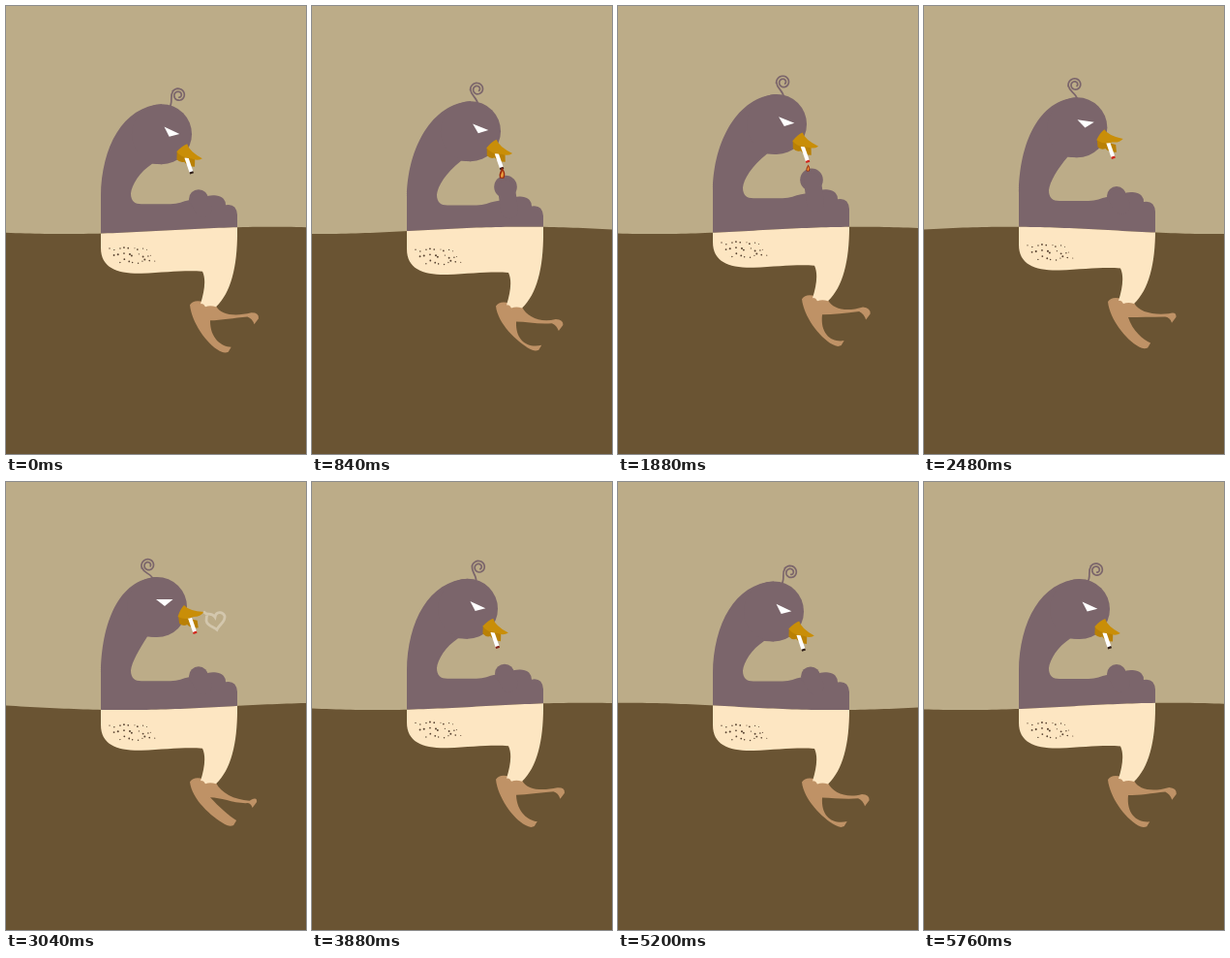
These frames come from a looping animation (310x462 px, 5.8 s). An HTML page with a canvas:

```html
<!DOCTYPE html>
<html lang="en">
<head>
<meta charset="utf-8">
<title>Smoking duck</title>
<style>
  html, body { margin: 0; width: 100%; height: 100%; overflow: hidden; background: #bcac88; }
  canvas { display: block; width: 310px; height: 462px; }
</style>
</head>
<body>
<canvas id="stage"></canvas>
<script>
const W = 310, H = 462, LOOP = 5800, TAU = Math.PI * 2;
const SKY = '#bcac88', GROUND = '#6a5433', SKIN = '#7b656b', LEG = '#fde6c2', FOOT = '#bf9266';
const canvas = document.getElementById('stage');
const ctx = canvas.getContext('2d');
const dpr = window.devicePixelRatio || 1;
canvas.width = W * dpr;
canvas.height = H * dpr;

// Eased 0 to 1 between two times
function ramp(t, from, to) {
  const k = Math.min(1, Math.max(0, (t - from) / (to - from)));
  return (1 - Math.cos(Math.PI * k)) / 2;
}

// Rises from a to b, stays, and falls from c to d
const hold = (t, a, b, c, d) => ramp(t, a, b) - ramp(t, c, d);

const cycle = (t, count, peak) => Math.cos(TAU * (count * t / LOOP - peak));

function seeded(seed) {
  return () => (seed = seed * 16807 % 2147483647) / 2147483647;
}

function fill(d, color) {
  ctx.fillStyle = color;
  ctx.fill(new Path2D(d));
}

function disc(x, y, r, color) {
  ctx.fillStyle = color;
  ctx.beginPath();
  ctx.arc(x, y, r, 0, TAU);
  ctx.fill();
}

function at(x, y, degrees, draw) {
  ctx.save();
  ctx.translate(x, y);
  ctx.rotate(degrees * Math.PI / 180);
  draw();
  ctx.restore();
}

function poseAt(t) {
  const light = hold(t, 200, 620, 2100, 2650);
  const blow = hold(t, 2150, 2700, 3300, 3900);
  const sway = hold(t, 2150, 2700, 3300, 4400);
  const turn = 25 - 3 * light - 25 * blow;
  const a = turn * Math.PI / 180, c = Math.cos(a), s = Math.sin(a);
  const hx = 161 + 3 * light - 5 * blow, hy = 131 - 4.3 * (light + blow);
  return {
    hx, hy, turn, blow,
    curl: 36 - 39 * light - 57 * sway,
    lift: hold(t, 220, 620, 2050, 2500),
    // Head coordinates to stage coordinates
    onHead: (x, y) => [hx + x * c - y * s, hy + x * s + y * c]
  };
}

function waterPath(t) {
  const path = new Path2D();
  const peak = 60 + 430 * 6 * t / LOOP;
  path.moveTo(0, H);
  for (let x = 0; x <= W; x += 5) path.lineTo(x, 231.4 + 3.7 * Math.cos(TAU * (x - peak) / 430));
  path.lineTo(W, H);
  path.closePath();
  return path;
}

function drawCurl({ onHead, curl }) {
  at(...onHead(-4, -30), curl, () => {
    ctx.beginPath();
    ctx.moveTo(0, 3);
    ctx.bezierCurveTo(0, -6, -7, -7, -7, -14);
    for (let k = 0; k <= 1; k += .02) {
      const a = Math.PI + k * 1.65 * TAU, r = 7.2 - 5 * k;
      ctx.lineTo(r * Math.cos(a), -14 + r * Math.sin(a));
    }
    ctx.strokeStyle = SKIN;
    ctx.lineWidth = 1.7;
    ctx.lineCap = 'round';
    ctx.stroke();
  });
}

function drawBody({ hx, hy, lift }) {
  fill(`M98 262V195C98.5 144 ${hx - 40} ${hy - 29} ${hx} ${hy - 31}V${hy + 31}L${hx - 10} ${hy + 30.5}
    C138 170 130 183 129 192C129 200 133 203 140 203H170C178 203 183 200 189 199L206 196
    C209 193 222 193 225 198Q227 200 227 204Q238 202 239 214V262Z`, SKIN);
  disc(hx, hy, 31, SKIN);
  const x = 199 + lift, y = 198 - 14 * lift;
  disc(x, y, 10 + 1.8 * lift, SKIN);
  ctx.strokeStyle = SKIN;
  ctx.lineWidth = 18;
  ctx.lineCap = 'round';
  ctx.beginPath();
  ctx.moveTo(x + 1, y + 2);
  ctx.lineTo(204, 208);
  ctx.stroke();
}

function drawFlame(x, y, t) {
  const size = hold(t, 560, 720, 1900, 2050) * (1 - .35 * ramp(t, 1150, 1500));
  if (size < .02) return;
  at(x, y + 10, 0, () => {
    ctx.scale(size, size * (1 + .08 * Math.sin(t / 30)));
    fill('M-2 0C-4 -5 -1 -7 0 -11C3 -7 4 -4 2 0Z', '#9c2a0c');
    fill('M-1 -1C-2 -4 0 -5 .5 -8C2 -5 2 -3 1 -1Z', '#ea9a3c');
  });
}

function drawFace({ hx, hy, turn, blow, onHead }, t) {
  const glow = hold(t, 750, 1150, 3300, 4500);
  const [x, y] = onHead(34.5, 12.5);
  at(hx, hy, turn, () => {
    fill('M-1 -8L16.5 -8L8 -1Z', '#fff');
    at(24, 10, 15 * blow, () => fill('M-2 0L1 7Q6 9 9 6Q14 9 21 6L18 -1Z', '#b98005'));
  });
  at(x, y, -19, () => {
    ctx.fillStyle = '#fff';
    ctx.fillRect(-2, -2, 4, 16);
    ctx.fillStyle = `rgb(${45 + 165 * glow}, ${28 + 12 * glow}, ${22 + 8 * glow})`;
    ctx.fillRect(-2, 13.5, 4, 2.2);
  });
  at(hx, hy, turn, () => fill('M21.5 10Q24 2 28 -2Q33 4 48.5 5Q45 10 38 10Q30 14 21.5 10Z', '#c98e08'));
  drawFlame(x + 5, y + 14, t);
}

function drawHeart(t) {
  const drawn = ramp(t, 2600, 2960), fade = ramp(t, 3120, 3550);
  if (!drawn || fade === 1) return;
  ctx.save();
  ctx.globalAlpha = .6 * (1 - fade);
  ctx.translate(216 + 8 * fade, 140 - 4 * fade);
  ctx.strokeStyle = '#e2d8c6';
  ctx.lineWidth = 2.8;
  ctx.lineCap = 'round';
  ctx.setLineDash([80 * drawn, 100]);
  ctx.stroke(new Path2D('M-11 -8C-8 -4 -4 -9 0 -3C1 -9 8 -9 10 -4C11 2 4 5 2 10C-2 7 -8 6 -9 1Q-9 -3 -8 -6'));
  ctx.restore();
}

function drawFeet(t) {
  const c = cycle(t, 12, 0), g = cycle(t, 12, .86);
  const ux = 258 + 1.5 * c, uy = 325.3 - 5.3 * c;
  const lx = 237 - 4.3 * c, ly = 349.5 + 3 * c;
  fill(`M190 307Q194 301 204 304L217 308
    C222 318 ${ux - 22} ${uy - 1} ${ux - 6} ${uy - 3 - 3 * g}
    Q${ux + 2} ${uy - 5} ${ux + 1.5} ${uy + 1}L${ux - 3} ${uy + 7}
    Q${ux - 5} ${uy + 1} ${ux - 10} ${uy + .5 - 2 * g}
    C${ux - 24} ${uy + 1 - g} 222 323 211 323
    C${214.5 - 6 * g} ${338 + 6 * g} ${226 - 5 * g} ${347 + 5 * g} ${lx} ${ly - 2}
    L${lx - 3} ${ly + 3}Q${lx - 7} ${ly + 5} ${lx - 12} ${ly + 2}
    C${lx - 26} ${ly - 6} 192 325 190 307Z`, FOOT);
}

function drawLeg() {
  fill(`M98 215V248C98 269 115 275 140 274.5C165 273.5 185 271 203 272.5
    C207 281 205 293 201 306Q204 305 206 309Q211 307 217 309C233 294 239.5 266 239 228V215Z`, LEG);
  const random = seeded(11);
  for (let row = 0; row < 3; row++) {
    for (let i = 0; i < 9; i++) {
      const x = 107 + 4 * row + 4.7 * i + 3 * random();
      const y = 247 + 6.5 * row + 4 * random();
      disc(x, y, .5 + .6 * random(), '#5a4432');
    }
  }
}

function draw(t) {
  const bob = -1.2 + 3.7 * cycle(t, 8, .14);
  const pose = poseAt(t);
  const water = waterPath(t);

  ctx.setTransform(dpr, 0, 0, dpr, 0, 0);
  ctx.fillStyle = SKY;
  ctx.fillRect(0, 0, W, H);

  ctx.save();
  ctx.translate(0, bob);
  drawCurl(pose);
  drawBody(pose);
  drawFace(pose, t);
  drawHeart(t);
  ctx.restore();

  ctx.fillStyle = GROUND;
  ctx.fill(water);
  ctx.save();
  ctx.clip(water);
  ctx.translate(0, bob);
  drawFeet(t);
  drawLeg();
  ctx.restore();
}

const start = performance.now();
function tick() {
  draw((performance.now() - start) % LOOP);
  requestAnimationFrame(tick);
}
tick();
</script>
</body>
</html>
```
